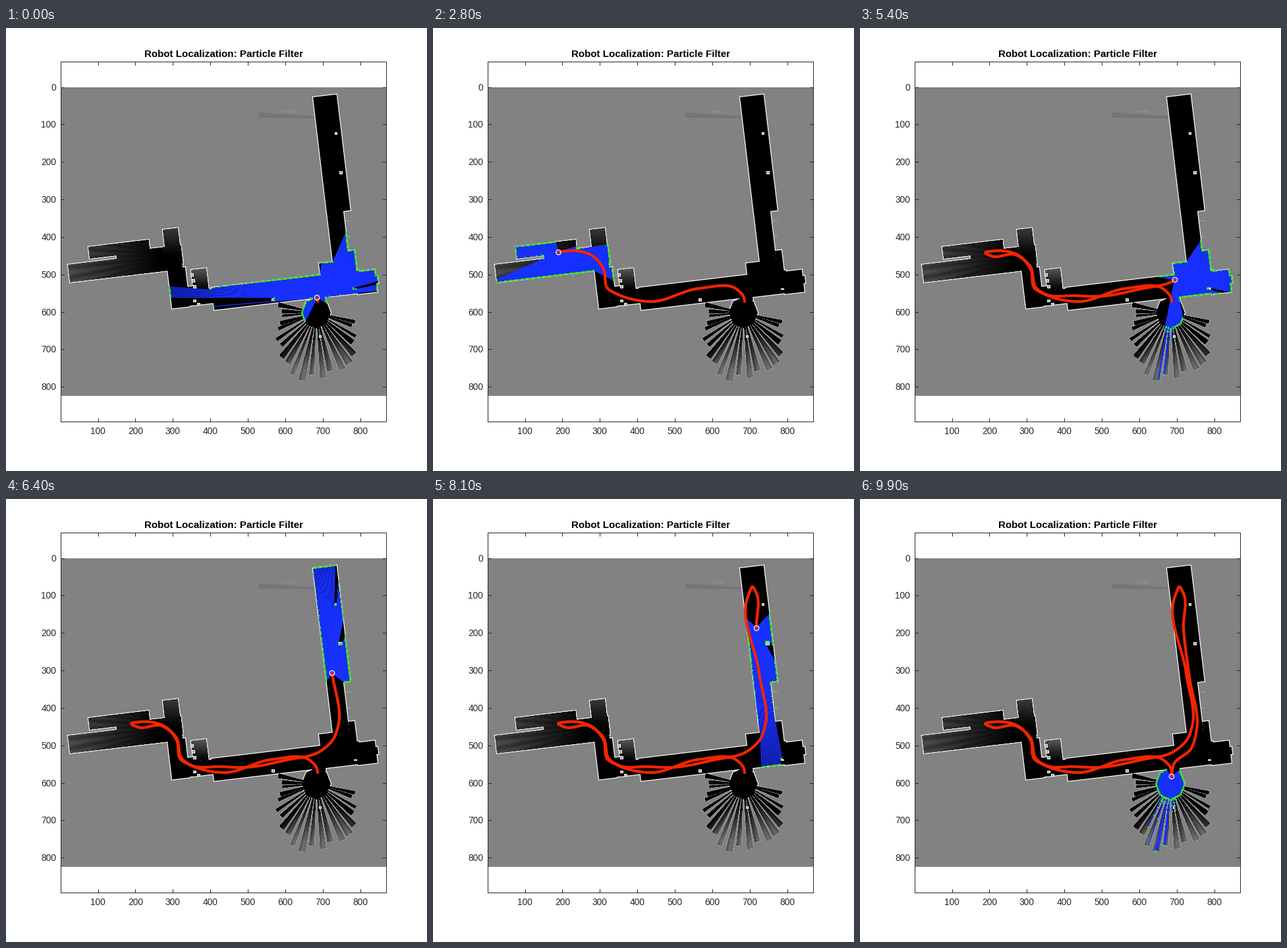
Animation of 639 by 672 pixels, one loop 10 s. Source, as a matplotlib script:

```python
import numpy as np
import matplotlib.pyplot as plt
from matplotlib.animation import FuncAnimation
from matplotlib.collections import LineCollection
from matplotlib.patches import Circle, Polygon, Rectangle
from matplotlib.path import Path

W, H = 639, 672
FRAMES = 100
GREY, INK = "#828282", "#262626"
BLUE, GREEN, RED = "#1830ff", "#35e020", "#f42400"
UNIT = 0.5684          # pixels per map cell
X0, Y0 = 82.8, 89.6    # pixel position of cell (0, 0)
TILT = np.radians(6.8)  # the building is turned by this much
rng = np.random.default_rng(4)

plt.rcParams["font.family"] = "Liberation Sans"
fig = plt.figure(figsize=(W / 72, H / 72), dpi=72, facecolor="white")
ax = fig.add_axes([0, 0, 1, 1])
ax.set(xlim=(0, W), ylim=(H, 0))
ax.axis("off")


# ---- floor plan, in pixels -------------------------------------------------
def box(x, y, w, h):
    """Tilted rectangle hung from its top left corner."""
    u = w * np.array([np.cos(TILT), -np.sin(TILT)])
    v = h * np.array([np.sin(TILT), np.cos(TILT)])
    p = np.array([x, y])
    return np.array([p, p + u, p + u + v, p + v])


def arc(c, rx, ry, a0, a1, n):
    a = np.radians(np.linspace(a0, a1, n))
    return np.column_stack([c[0] + rx * np.cos(a), c[1] + ry * np.sin(a)])


WEST = [box(125, 332, 92, 18), box(94, 359, 155, 27), box(167, 341, 99, 28),
        box(238, 306, 23, 62)]
ALCOVE = [box(281, 367, 23, 32)]
HALLS = [
    box(466, 105, 36, 177), box(487, 280, 25, 100),                # north
    box(475, 357, 54, 52), box(519, 338, 10, 35),                  # junction
    box(530, 370, 30, 34), box(555, 377, 9, 11),
    box(312, 394, 225, 34), box(282, 399, 34, 22),                 # main hall
    box(245, 366, 27, 60), box(272, 393, 16, 29),                  # lobby
    box(464, 400, 20, 16)]                                         # lab door
BLOCKS = [(402, 409, 5, 5), (498, 157, 4, 4), (505, 216, 5, 5),
          (527, 394, 5, 2), (474, 465, 4, 4)]
BLOCKS += [(279 + 2 * k, 371 + 9 * k, 5, 5) for k in range(3)]
BLOCKS += [(283 + 6 * k, 411 + 5 * k, 5, 4) for k in range(2)]

# The lab is a round core with a fan of beams, longest straight down.
LAB = np.array([471, 432])
core = arc(LAB, 22, 24, 0, 360, 9)
beams, open_beams = [], []
for deg in np.arange(12, 193, 9):
    a = deg + rng.uniform(-1.5, 1.5)
    half = rng.uniform(1.6, 3.6)
    r = (55 + 48 * np.sin(np.radians(a)) ** 2) * rng.uniform(0.88, 1.05)
    wedge = np.vstack([LAB, arc(LAB, r, r, a - half, a + half, 3)])
    beams.append(wedge)
    if 70 < deg < 128:
        open_beams.append(wedge)

gy, gx = np.mgrid[0:H, 0:W] + 0.5
cells = np.column_stack([gx.ravel(), gy.ravel()])


def inside(shapes):
    hit = np.zeros(W * H, bool)
    for s in shapes:
        hit |= Path(s).contains_points(cells)
    return hit.reshape(H, W)


def fill(points, color, z, **kw):
    ax.add_patch(Polygon(points, closed=True, fc=color, zorder=z, **kw))


ax.add_patch(Rectangle((83, 90), 494, 468, fc=GREY, ec="none", zorder=0))
fill([(383, 128), (468, 134), (468, 137), (383, 136)], "#757575", 1, ec="none")
fill([(412, 127), (436, 124), (442, 129)], "#8a8a8a", 1, ec="none")
for y in (292, 316):
    ax.plot([512, 523], [y - 1, y + 1], color="#a8a8a8", lw=1, zorder=1)

rooms = WEST + ALCOVE + HALLS + [core]
for shapes, edge, width in ((beams, "#c8c8c8", 1.2), (rooms, "white", 2.4)):
    for s in shapes:
        fill(s, "black", 2, ec=edge, lw=width, joinstyle="miter")
for s in beams + rooms:
    fill(s, "black", 3, ec="none")

free = inside(rooms + open_beams)
for bx, by, bw, bh in BLOCKS:
    free[by:by + bh, bx:bx + bw] = False
    ax.add_patch(Rectangle((bx + 0.5, by + 0.5), bw - 1, bh - 1, fc="#a0a0a0",
                           ec="white", lw=1, zorder=4))


# ---- soft grey where the map is uncertain ----------------------------------
def ramp(v, start, stop):
    return np.clip((v - start) / (stop - start), 0, 1)


def streaks(c, n):
    return 0.85 + 0.15 * np.sin(n * np.arctan2(gy - c[1], gx - c[0]))


radius = np.hypot(gx - LAB[0], gy - LAB[1])
down = np.sin(np.arctan2(gy - LAB[1], gx - LAB[0]) + 0.07) ** 2
west = np.maximum(80 * ramp(gx, 235, 95) * streaks((262, 345), 70),
                  55 * ramp(gy, 345, 305) * (gx > 236))
alcove = 85 * ramp(gy, 396, 366)
fan = 110 * np.clip(4 * down - 2, 0, 1) * ramp(radius, 28, 90) * streaks(LAB, 40)
shade = np.zeros((H, W, 4))
for shapes, tone in ((WEST, west), (ALCOVE, alcove), (beams, fan)):
    area = inside(shapes)
    shade[area, :3] = tone[area, None] / 255
    shade[area, 3] = 1
ax.imshow(shade, extent=(0, W, H, 0), interpolation="nearest", zorder=3.5,
          aspect="auto")

# ---- axes box, ticks and labels --------------------------------------------
L, R, T, B = 83, 577, 51, 597
ink = dict(color=INK, lw=1, zorder=9)
ax.plot([L, R, R, L, L], [T, T, B, B, T], **ink)
for v in range(0, 900, 100):
    y = Y0 + UNIT * v
    for a, b in ((L, L + 5), (R - 5, R)):
        ax.plot([a, b], [y, y], **ink)
    ax.text(76, y - 0.5, str(v), size=13.8, color=INK, ha="right",
            va="center_baseline")
    if v:
        x = X0 + UNIT * v
        for a, b in ((T, T + 5), (B - 5, B)):
            ax.plot([x, x], [a, b], **ink)
        ax.text(x, 615.5, str(v), size=13.8, color=INK, ha="center",
                va="baseline")
ax.text(331, 44, "Robot Localization: Particle Filter", size=15.1,
        weight="bold", color="black", ha="center", va="baseline")

# ---- route: each leg ends at a known time ----------------------------------
LEGS = {
    0: [(473, 415), (472, 409)],
    17: [(462, 397), (404, 395), (330, 415), (280.5, 404)],
    39: [(265, 395), (259, 366), (244, 347), (205, 338), (190, 341),
         (200, 346), (236, 344), (258, 361), (268, 395), (280.5, 403.5)],
    54: [(325, 406), (365, 407), (425, 396), (478, 382)],
    64: [(497, 364), (504, 345), (495, 264)],
    81: [(479, 145), (485, 133), (490, 141), (491, 196)],
    99: [(500, 270), (511, 350), (503, 378), (476, 403), (473, 421)],
}
SUB = 24


def smooth(p):
    """Cubic curve through the points, even where they lie unevenly."""
    s = np.r_[0, np.cumsum(np.hypot(*np.diff(p, axis=0).T))]
    m = np.gradient(p, s, axis=0)
    t = np.arange(SUB)[:, None] / SUB
    out = []
    for a, b, ma, mb, h in zip(p, p[1:], m, m[1:], np.diff(s)):
        out.append(a + (b - a) * t * t * (3 - 2 * t)
                   + h * t * (1 - t) * (ma * (1 - t) - mb * t))
    return np.vstack(out + [p[-1:]])


route = smooth(np.array(sum(LEGS.values(), []), float))
dist = np.r_[0, np.cumsum(np.hypot(*np.diff(route, axis=0).T))]
stops = dist[(np.cumsum([len(g) for g in LEGS.values()]) - 1) * SUB]


def at(d):
    return np.array([np.interp(d, dist, route[:, k]) for k in (0, 1)])


# ---- laser scan ------------------------------------------------------------
FOV = np.radians(np.arange(-135, 135.1, 0.5))
REACH = np.arange(2, 340, 0.5)


def scan(pos, heading):
    u = np.column_stack([np.cos(heading + FOV), np.sin(heading + FOV)])
    p = pos + REACH[:, None, None] * u
    col = np.clip(p[..., 0].astype(int), 0, W - 1)
    row = np.clip(p[..., 1].astype(int), 0, H - 1)
    r = REACH[np.argmin(free[row, col], axis=0)]
    return pos + r[:, None] * u


rays = LineCollection([], colors=BLUE, linewidths=1.25, zorder=5)
ax.add_collection(rays)
hits, = ax.plot([], [], "s", color=GREEN, ms=2, mew=0, zorder=6)
trail, = ax.plot([], [], color=RED, lw=4.2, solid_capstyle="round",
                 solid_joinstyle="round", zorder=7)
ring = Circle((0, 0), 3.7, fill=False, ec="white", lw=1.2, zorder=8)
ax.add_patch(ring)


def update(i):
    d = np.interp(i, list(LEGS), stops)
    pos = at(d)
    dx, dy = at(d + 4) - at(d - 4)
    ends = scan(pos, np.arctan2(dy, dx))
    rays.set_segments([(pos, e) for e in ends])
    hits.set_data(*ends.T)
    trail.set_data(*np.vstack([route[dist < d], pos]).T)
    ring.center = tuple(pos)
    return rays, hits, trail, ring


anim = FuncAnimation(fig, update, frames=FRAMES, interval=100, repeat=True,
                     repeat_delay=0, blit=False)
plt.show()
```
